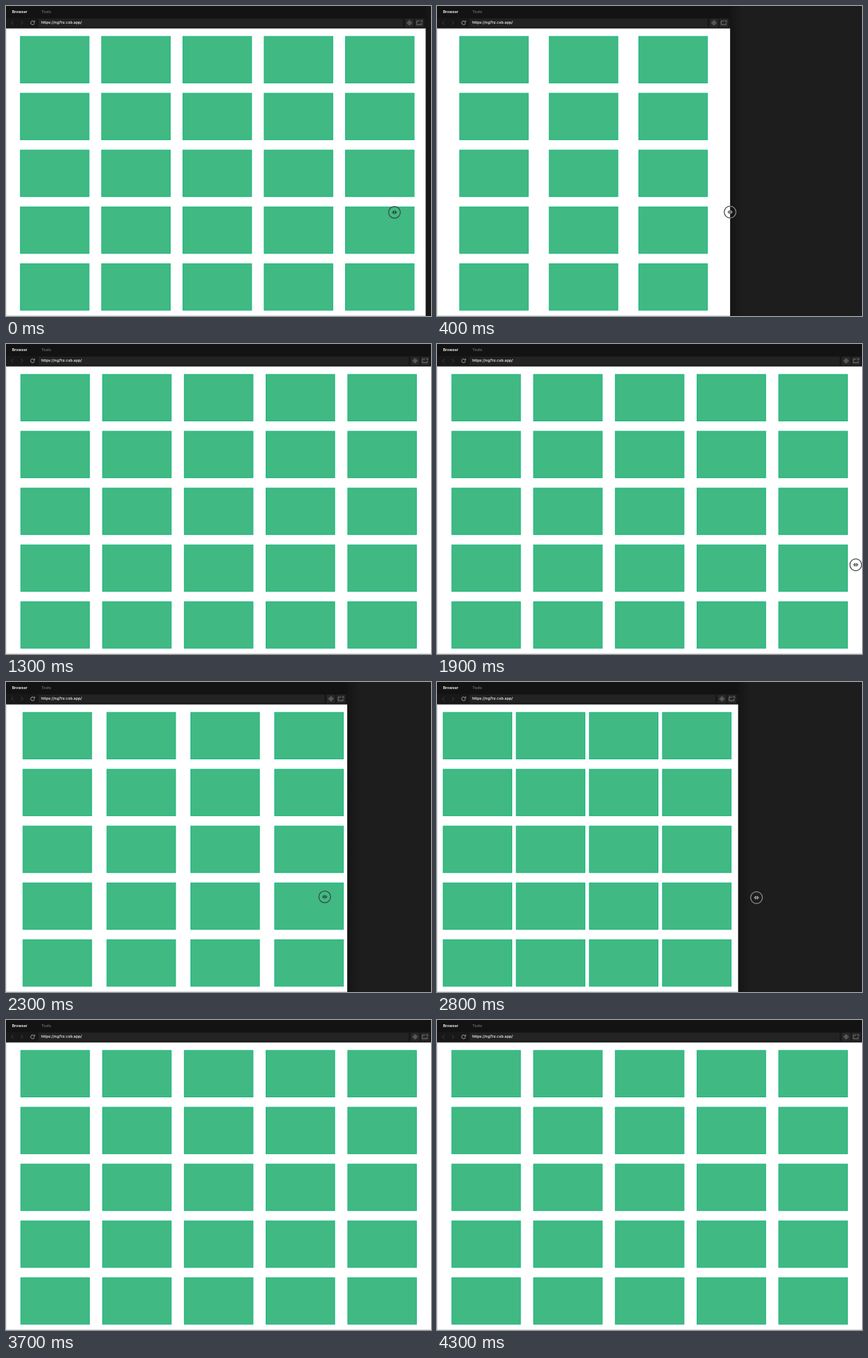
These frames come from a looping animation (599 px wide and 437 px high, 4400 ms). An HTML page with a canvas:

```html
<!DOCTYPE html>
<html lang="en">
<head>
<meta charset="utf-8">
<title>Responsive grid</title>
<style>
  html, body { margin: 0; width: 100%; height: 100%; overflow: hidden; background: #1d1d1d; }
  canvas { display: block; }
</style>
</head>
<body>
<canvas id="stage" width="599" height="437"></canvas>
<script>
const ctx = document.getElementById('stage').getContext('2d');
const STAGE = { w: 599, h: 437 };
const LOOP = 4400, STEP = 100;
const CARD = { w: 97.8, h: 66.6, top: 42.4, pitch: 80.1, minGap: 5 };
const PADDING = 3, HEADER = 31.3, MAX_WIDTH = 599.4;
const WINDOW_LAG = 100, GRID_LAG = 150;

// The pointer drags the window edge in, out, in and out again.
// A skew above 1 delays the start of a drag, below 1 hurries it.
const HOME = { x: 595.6, y: 291 };
const drags = [
  { start: -175, duration: 357, x: 413.1, y: 290.5, skew: 1.5 },
  { start: 460, duration: 815, x: 620, y: 313, skew: 1 },
  { start: 1700, duration: 786, x: 423.3, y: 301.3, skew: 1 },
  { start: 2690, duration: 817, x: 600, y: 319, skew: 0.68 }
];

const ease = p => (1 - Math.cos(Math.PI * p)) / 2;

function pointerAt(t) {
  let { x, y } = HOME;
  for (const drag of drags) {
    const p = Math.min(1, Math.max(0, (t - drag.start) / drag.duration));
    const progress = ease(p ** drag.skew);
    x += (drag.x - x) * progress;
    y += (drag.y - y) * progress;
  }
  return { x, y };
}

const edgeAt = t => Math.min(MAX_WIDTH, pointerAt(t).x);

function rect(x, y, w, h, color) {
  ctx.fillStyle = color;
  ctx.fillRect(x, y, w, h);
}

function line(points, color, width = 0.8) {
  ctx.beginPath();
  points.forEach(([x, y]) => ctx.lineTo(x, y));
  ctx.strokeStyle = color;
  ctx.lineWidth = width;
  ctx.stroke();
}

function arc(x, y, radius, from, to, color, width) {
  ctx.beginPath();
  ctx.arc(x, y, radius, from, to);
  ctx.strokeStyle = color;
  ctx.lineWidth = width;
  ctx.stroke();
}

function clipped(left, right, paint) {
  ctx.save();
  ctx.beginPath();
  ctx.rect(left, 0, right - left, STAGE.h);
  ctx.clip();
  paint();
  ctx.restore();
}

function label(text, x, y, color, weight) {
  ctx.font = `${weight} 5.4px Inter, sans-serif`;
  ctx.fillStyle = color;
  ctx.fillText(text, x, y);
}

function drawHeader(width) {
  rect(0, 0, width, HEADER, '#131313');
  rect(0, 17, width, HEADER - 17, '#181818');
  label('Browser', 8.5, 10, '#fff', 600);
  label('Tests', 50, 10, '#858585', 400);

  const mid = 23.7;
  for (const [x, side] of [[9, -1], [22.5, 1]]) {
    line([[x - side * 1.5, mid - 2.7], [x + side * 1.5, mid], [x - side * 1.5, mid + 2.7]], '#4a4a4a');
  }
  arc(37.5, mid, 2.7, 0.2, Math.PI * 1.75, '#b5b5b5', 0.8);
  line([[40.4, 20.5], [40.4, 22.8], [38.2, 22.8]], '#b5b5b5');

  rect(46, 18, width - 78, 11.5, '#232323');
  label('https://ng7rz.csb.app/', 49.5, 25.3, '#fff', 500);

  const target = width - 22.8, share = width - 8.8;
  for (const x of [target, share]) rect(x - 6, 18, 12, 11.5, '#282828');
  line([[target, mid - 3.3], [target + 3.3, mid], [target, mid + 3.3], [target - 3.3, mid], [target, mid - 3.3]], '#8c8c8c');
  line([[target - 2, mid], [target + 2, mid]], '#858585');
  line([[target, mid - 2], [target, mid + 2]], '#858585');
  line([[share, 21.2], [share - 3.8, 21.2], [share - 3.8, 26.3], [share + 3, 26.3], [share + 3, 24]], '#858585');
  line([[share + 1.3, 20.8], [share + 3.8, 20.8], [share + 3.8, 22.8]], '#858585');
}

function drawGrid(width) {
  const inner = width - 2 * PADDING;
  const columns = Math.floor(inner / (CARD.w + CARD.minGap));
  const gap = (inner - columns * CARD.w) / (columns + 1);
  for (let row = 0; row < 5; row++) {
    for (let col = 0; col < columns; col++) {
      const x = PADDING + gap + col * (CARD.w + gap);
      const y = CARD.top + row * CARD.pitch;
      rect(x, y, CARD.w, CARD.h, '#1cb782');
      rect(x + 1, y + 1, CARD.w - 2, CARD.h - 2, '#40b983');
    }
  }
}

function drawPointer({ x, y }, edge) {
  if (x > STAGE.w) return;
  const paint = (ring, arrow) => {
    arc(x, y, 8.3, 0, Math.PI * 2, ring, 1.2);
    for (const side of [-1, 1]) {
      line([[x + side, y - 2], [x + side * 3.2, y], [x + side, y + 2], [x + side, y - 2]], arrow, 1);
    }
  };
  clipped(0, edge, () => paint('#3a4641', '#2a2a2a'));
  clipped(edge, STAGE.w, () => paint('#8e8e8e', '#c4c4c4'));
}

function draw(t) {
  // The window trails the pointer, and the grid trails the window.
  const width = edgeAt(t - WINDOW_LAG);

  rect(0, 0, STAGE.w, STAGE.h, '#1d1d1d');
  const shade = ctx.createLinearGradient(width, 0, width + 18, 0);
  shade.addColorStop(0, '#151515');
  shade.addColorStop(1, '#1d1d1d');
  rect(width, 0, 18, STAGE.h, shade);

  rect(0, HEADER, width, STAGE.h - HEADER, '#fff');
  rect(0, HEADER, 0.6, STAGE.h - HEADER, '#ccc');
  rect(0, STAGE.h - 0.7, width, 0.7, '#ccc');
  clipped(0, width, () => drawGrid(edgeAt(t - GRID_LAG)));
  drawHeader(width);
  drawPointer(pointerAt(t), width);
}

const start = performance.now();
function tick() {
  const elapsed = (performance.now() - start) % LOOP;
  draw(Math.floor(elapsed / STEP) * STEP);
  requestAnimationFrame(tick);
}
tick();
</script>
</body>
</html>
```
